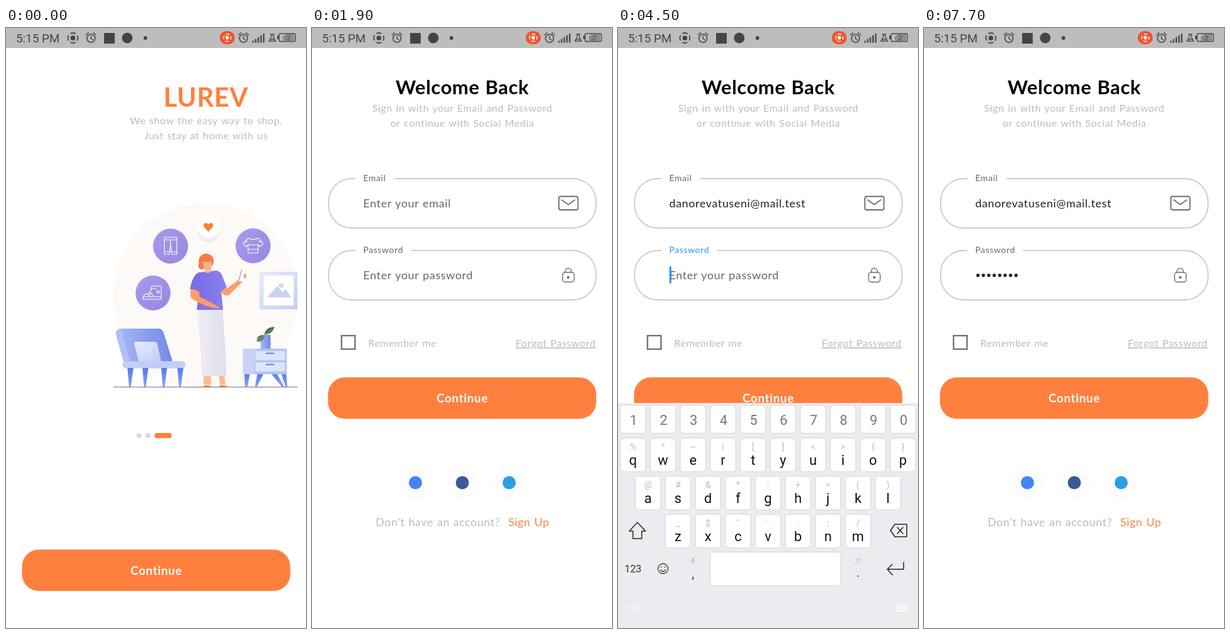
An HTML page that plays this animation: 480 by 960 pixels, repeating every 8 s.

```html
<!DOCTYPE html>
<html lang="en">
<head>
<meta charset="utf-8">
<style>
html, body { margin: 0; width: 100%; height: 100%; overflow: hidden; background: #fff; }
svg { display: block; width: 480px; height: 960px; font-family: Lato, sans-serif; letter-spacing: .04em; word-spacing: .06em; }
text { text-anchor: middle; fill: #bbb; white-space: pre; }
.start { text-anchor: start; }
.bold { font-weight: 700; }
.ui { font-family: Roboto, "Noto Sans CJK JP", sans-serif; letter-spacing: 0; word-spacing: 0; }
.line { fill: none; stroke-linecap: round; stroke-linejoin: round; }
</style>
</head>
<body>
<svg id="stage" viewBox="0 0 480 960">
<defs>
  <linearGradient id="violet" x1="0" y1="0" x2="1" y2="1"><stop stop-color="#a69bf0"/><stop offset="1" stop-color="#9488df"/></linearGradient>
  <linearGradient id="blue"><stop stop-color="#a9b8f6"/><stop offset="1" stop-color="#7088e8"/></linearGradient>
  <linearGradient id="pale" x1="0" y1="0" x2="1" y2="1"><stop stop-color="#e6ebfc"/><stop offset="1" stop-color="#c3cdf5"/></linearGradient>
  <linearGradient id="blouse"><stop stop-color="#766be6"/><stop offset="1" stop-color="#8a80ee"/></linearGradient>
  <linearGradient id="skirt"><stop stop-color="#f0eef3"/><stop offset="1" stop-color="#dfdeee"/></linearGradient>
  <linearGradient id="leg" x2="0" y2="1"><stop stop-color="#557be8"/><stop offset="1" stop-color="#86a5f8"/></linearGradient>
</defs>
</svg>
<script>
const ORANGE = '#ff803e', BLUE = '#2196f3', EMAIL = 'danorevatuseni@mail.test', SHORT = 'dan...@mai...test';
const stage = document.getElementById('stage');
const $ = id => document.getElementById(id);
const esc = s => s.replace(/&/g, '&amp;').replace(/</g, '&lt;');

const text = (x, y, size, str, attrs = '') =>
  `<text x="${x}" y="${y}" font-size="${size}" ${attrs}>${esc(str)}</text>`;
const fill = color => `style="fill:${color}"`;
const rect = (x, y, w, h, color, r = 0, attrs = '') =>
  `<rect x="${x}" y="${y}" width="${w}" height="${h}" rx="${r}" fill="${color}" ${attrs}/>`;
const circle = (x, y, r, color, attrs = '') =>
  `<circle cx="${x}" cy="${y}" r="${r}" fill="${color}" ${attrs}/>`;
const shape = (d, color) => `<path d="${d}" fill="${color}"/>`;
const line = (d, color = '#222', width = 1.5) =>
  `<path class="line" d="${d}" stroke="${color}" stroke-width="${width}"/>`;
const ring = (x, y, r, color = '#222', width = 1.5, attrs = '') =>
  circle(x, y, r, 'none', `stroke="${color}" stroke-width="${width}" ${attrs}`);
const group = (id, body, attrs = '') => `<g id="${id}" ${attrs}>${body}</g>`;
const button = y => rect(25.6, y, 429.2, 66.3, ORANGE, 27) +
  text(240.5, y + 40.3, 19, 'Continue', `class="bold" ${fill('#fff')}`);

function statusBar() {
  const ink = '#444';
  const record = (x, y, r, c) => circle(x, y, r * .48, c) +
    ring(x, y, r, c, r * .22, `stroke-dasharray="${r * 1.1} ${r * .47}" stroke-dashoffset="${r * .55}"`);
  const alarm = x => ring(x, 16.5, 6.5, ink, 1.6) + line(`M${x} 13v4l3 2M${x - 8} 11l4-3.500M${x + 8} 11l-4-3.500`, ink, 1.5);
  const bars = [0, 1, 2, 3, 4].map(i => rect(394 + i * 4.3, 20.5 - i * 2.9, 2.3, 3 + i * 2.9, ink)).join('');
  return rect(0, 0, 480, 32, '#bdbdbd') +
    text(16, 23, 19, '5:15 PM', `class="ui start" ${fill(ink)}`) +
    record(107, 16, 8, ink) + alarm(136) + rect(157, 8, 17, 17, ink) + circle(194, 16, 8.5, ink) + circle(223, 16, 3, ink) +
    rect(342, 5, 24, 21, '#f4512c', 10.5) + record(354, 15.5, 6, '#fff') + alarm(380) + bars +
    line('M423 10h6M424.500 10v4l-4 7h11l-4-7v-4M422.500 18h7', ink, 1.3) +
    rect(447, 10, 14, 10, '#8d8d8d') + rect(437, 9, 26, 12.5, 'none', 2, `stroke="${ink}" stroke-width="1.4"`) +
    rect(434, 12, 2.5, 6, ink) + text(449, 19.5, 11, '62', `class="ui" ${fill(ink)}`);
}

function chair() {
  return shape('M186 481H245Q251 481 253 488L268 536H194Q190 536 188 531L177 491Q175 481 186 481Z', 'url(#blue)') +
    shape('M180 483Q176 485 177 491L188 531Q190 536 194 536H200L184 481Z', '#b3c0f6') +
    shape('M209 502H238Q242 502 243 506L249 533H213L206 506Q205 502 209 502Z', 'url(#pale)') +
    circle(232, 518, 1.3, '#fff') +
    rect(187, 533, 101, 11.5, '#c3cdf7', 6) +
    [195, 219, 249, 275].map(x => shape(`M${x} 544h9.500l-4 30h-3z`, 'url(#leg)')).join('');
}

function cabinet() {
  const drawer = y => rect(400, y, 47, 14.5, '#dce4fb') + line(`M417 ${y + 3.5}h12`, '#5b83ee', 2);
  return shape('M382 553h9l-4 21h-4zM403 553h10l-11 21h-3zM425 553h9l12 21h-4zM441 553h8l2 21h-3z', 'url(#leg)') +
    rect(380, 513, 70, 41, '#b5c2f3') + rect(380, 513, 19, 41, '#c9d3f7') + drawer(517) + drawer(535) +
    rect(408, 491, 16, 22, 'url(#blue)') +
    shape('M415 492Q401 489 402 502Q413 502 415 492Z', '#52806b') +
    shape('M414 491Q416 479 430 478Q428 489 414 491Z', '#3a6c5c') +
    line('M404 500L414 492L428 480', '#d8a85c', .9);
}

function woman() {
  const skin = '#ff9c6b', peach = '#ffb996';
  return shape('M317 555h11l1 16h-12zM341 555h9l2 16h-9z', peach) +
    shape('M317 575v-3h9l5 3zM342 575v-3h9l6 3z', ORANGE) +
    shape('M308 450H347Q352 505 353 557H314Q312 500 306 460Z', 'url(#skirt)') +
    shape('M343 419L355 416L374 402L379 406L358 427Q352 430 347 425Z', skin) +
    shape('M320 390L338 388Q344 390 346 395L354 415L345 421L348 451H306L309 422L295 418Q299 396 309 391Z', 'url(#blouse)') +
    shape('M297 417L309 421L311 430L332 441Q342 446 342 449Q318 447 298 433Q294 429 297 417Z', skin) +
    shape('M319 382H329V389Q325 395 319 390Z', peach) +
    circle(321, 373, 12, '#f97b43') + circle(314, 380.5, 5.5, '#f97b43') +
    shape('M315 374H330Q331 386 323 387Q316 385 315 374Z', '#ffb08a') +
    shape('M378 387L391 387L387 406L373 405Z', '#fff') + line('M378 387L373 404', '#6f7fdc', 1) +
    `<ellipse cx="383" cy="397" rx="2" ry="4" fill="${skin}"/>`;
}

function intro() {
  const pants = 'M254 335h20v27h-8l-2-16-2 16h-8zM254 339h20M264 339v7M254 358h8M266 358h8';
  const shirt = 'M388 336q8 5 16 0l8 9-4 5-4-3v13h-16v-13l-4 3-4-5zM388 347h16M388 354h16M382 343l5-2M410 343l-5-2';
  const boot = 'M234 413h15v21h-29q-1-6 4-8l7-2zM220 430h29M234 417h7M232 424l4 4M228 426l4 4M242 422a2 2 0 1 0 4 0a2 2 0 1 0-4 0';
  return text(320.5, 125.5, 42, 'LUREV', `class="bold" ${fill(ORANGE)}`) +
    text(321, 154, 16, 'We show the easy way to shop.') + text(321, 178, 16, 'Just stay at home with us') +
    circle(320, 429, 149, '#fcf9f7') +
    [[264, 349, pants], [396, 348.5, shirt], [236, 424, boot]].map(([x, y, d]) =>
      circle(x, y, 28, 'url(#violet)') + line(d, '#fff', 1.1)).join('') +
    circle(325, 325, 18, '#ededf1') + circle(325, 318, 18.5, '#fff') +
    shape('M324.500 326L318 319Q315 315 318.500 312.500Q322 310.500 324.500 314.500Q327 310.500 330.500 312.500Q334 315 331 319Z', '#fb7f36') +
    rect(406, 390, 61, 60, 'url(#pale)') + rect(413, 396, 48, 48, '#fff') +
    shape('M418 431L435 413L443 422L448 418L457 431Z', '#c9d4f5') + circle(441, 412, 4, '#d3dbf6') +
    chair() + cabinet() + woman() + line('M173 574.500H467', '#777', 1);
}

function field(y, id, label, hint, notch) {
  return line(`M${notch} ${y}H417.500a37 37 0 0 1 37 37v5a37 37 0 0 1-37 37H63.500a37 37 0 0 1-37-37v-5a37 37 0 0 1 37-37H69`, '#bdbdbd', 1.4) +
    text(82, y + 4, 14, label, `id="${id}Label" class="start"`) +
    text(82, y + 46, 18, hint, `id="${id}Hint" class="start" ${fill('#666')}`);
}

function login() {
  const grey = '#6b6b6b';
  const dots = [...Array(8).keys()].map(i => circle(86.3 + i * 8.7, 395.7, 2.7, '#222', 'class="dot"')).join('');
  const social = ['#4285f4', '#3b5998', '#2a9fe4'].map((c, i) =>
    circle(165.5 + i * 75, 727.5, 25, '#fcfcfc') + circle(165.5 + i * 75, 727.5, 10.5, c)).join('');
  return rect(0, 32, 480, 928, '#fff') +
    text(240.5, 106, 31, 'Welcome Back', `class="bold" ${fill('#000')}`) +
    text(240.5, 134, 16, 'Sign in with your Email and Password') +
    text(240.5, 158, 16, 'or continue with Social Media') +
    field(241, 'email', 'Email', 'Enter your email', 132) + field(356, 'pass', 'Password', 'Enter your password', 159) +
    text(82, 287, 18, EMAIL, `id="email" class="start" ${fill('#222')}`) + dots +
    rect(0, 0, 3, 27, BLUE, 0, 'id="cursor"') +
    rect(395, 269.5, 30.5, 21.5, 'none', 3, `stroke="${grey}" stroke-width="1.8"`) + line('M399.500 275l10.500 7.500 10.500-7.500', grey, 1.6) +
    rect(401, 391, 18.5, 15.5, 'none', 4, `stroke="${grey}" stroke-width="1.4"`) +
    line('M405 391v-2a5 4.500 0 0 1 10 0v2', grey, 1.4) + circle(410, 399, 2.1, grey) +
    rect(47.2, 492.2, 21.6, 21.6, 'none', 0, 'stroke="#757575" stroke-width="2.4"') +
    text(90, 510, 16, 'Remember me', 'class="start"') +
    text(326, 510, 16, 'Forgot Password', 'class="start" text-decoration="underline"') +
    button(559) + social +
    text(102, 797, 17.8, "Don't have an account?", 'class="start"') +
    text(314, 797, 17.8, 'Sign Up', `class="start" ${fill(ORANGE)}`);
}

function toolbar() {
  const suggest = (x, size, str, c) => text(x, size > 18 ? 635 : 632.5, size, str, fill(c));
  return rect(25, 570.5, 26, 19, 'none', 4, 'stroke="#222" stroke-width="1.6"') +
    text(38, 584, 10.5, 'GIF', `class="bold" ${fill('#222')}`) +
    line('M97 569h16q4 0 4 4v10l-8 8h-12q-4 0-4-4v-14q0-4 4-4zM117 583h-5q-3 0-3 3v5M98 581q5 6 9 1M100 575v1M110 575v1') +
    line('M167 571h-4v22h20v-22h-4M168 568h10v5h-10zM167 579h12M167 583h12M167 587h7') +
    text(232, 591, 21, 'a', fill('#222')) + text(247, 583, 15, 'あ', fill('#222')) +
    line('M230 576q0-4 6-5M234 568l3 3-3 3M252 586q0 4-6 4M248 587l-3 3 3 3', '#222', 1.3) +
    line('M294 581l4-4 6 6 12-13 4 4-16 17zM304 578l8-8', '#222', 1.3) +
    ring(376, 581, 13) + line('M376 579v8') + circle(376, 574.5, 1.3, '#222') +
    [436, 443, 450].map(x => circle(x, 581, 1.6, '#222')).join('') +
    rect(0, 604.5, 480, 47, '#fbfbfc', 0, 'stroke="#d3d3d7" stroke-width="1"') +
    line('M17 620l5 5 5-5M17 636l5-5 5 5', '#777', 1.4) + suggest(240, 15, SHORT, '#111') +
    group('words', suggest(103, 21, 'I', '#888') + suggest(377, 21, 'the', '#888')) +
    group('endings', suggest(103, 10, SHORT + 'p', '#888') + suggest(377, 10, SHORT + 'h', '#888'));
}

function keyboard(secret) {
  const key = (x, y, w, h) => rect(x + .5, y + .5, w - 1, h - 1, '#fff', 6, 'stroke="#d2d2d7"');
  const letters = ['qwertyuiop', 'asdfghjkl', 'zxcvbnm'];
  const hints = [secret ? '%^~|[]<>{}' : '1234567890', '@#&*-+=()', '_$"\':;/'];
  const top = secret ? 600 : 556;
  const [num, face, mic, dot, enter] = secret ? [24, 72, 120, 384, 444] : [26, 77, 125, 403, 453];
  let out = rect(0, top, 480, 820, '#ebecf0');
  if (secret) [...'1234567890'].forEach((c, i) =>
    out += key(3 + 48 * i, 603, 42, 46) + text(25 + 48 * i, 634.5, 22, c, fill('#777')));
  else out += toolbar();
  letters.forEach((row, r) => [...row].forEach((c, i) => {
    const x = [3, 27, 75][r] + 48 * i, y = [655.5, 716.5, 777.5][r];
    out += key(x, y, 42, 55) + text(x + 21, y + 19.5, 14, hints[r][i]) + text(x + 21, y + 43, 22, c, fill('#111'));
  }));
  out += line('M31 791l13 14h-6v12h-14v-12h-6z') +
    line('M443 794h19v20h-19l-7-10zM447 799l9 10M456 799l-9 10') +
    text(num, secret ? 871 : 872, secret ? 16 : 20, '123', fill('#333')) +
    ring(face, 865, 8, '#333', 1.3) + line(`M${face - 4} 867q4 5 8 0M${face - 3} 862v1M${face + 3} 862v1`, '#333', 1.3) +
    rect(mic - 1.5, 848, 3, 6, '#bbb', 1.5) + line(`M${mic - 3} 853q3 5 6 0M${mic} 856v2`, '#bbb', 1) +
    text(mic, 880, 20, ',', fill('#333')) + text(dot, 858, 12, ',!?') + text(dot, 878, 20, '.', fill('#333')) +
    (secret ? key(147, 838, 210, 55) + line(`M${enter + 13} 855v11h-26M${enter - 5} 858l-8 8 8 9`)
      : key(152, 838, 176, 55) + text(355, 878, 18, '@', fill('#333')) + line('M463 857v8h-20M449 859l-6 6 6 6', '#333'));
  return group(secret ? 'secretKeys' : 'emailKeys', out, 'class="ui"');
}

function navIcons() {
  let keys = '';
  for (let r = 0; r < 2; r++) for (let i = 0; i < 5; i++) keys += rect(443.5 + i * 4 + r * 1.5, 923 + r * 4, 2.5, 2.5, '#fff');
  return line('M21 925l5.500 5.500 5.500-5.500', '#fff', 1.6) + keys + rect(448, 931.5, 11, 2.5, '#fff');
}

stage.insertAdjacentHTML('beforeend',
  group('intro', intro()) +
  circle(212.7, 652, 4, '#d9d9d9') + circle(227, 652, 4, '#d9d9d9') + rect(237.8, 648, 27.2, 8.2, ORANGE, 4) + button(834.5) +
  group('login', login()) + keyboard(false) + keyboard(true) + navIcons() + statusBar());

const show = (el, on) => el.setAttribute('display', on ? 'inline' : 'none');
const clamp = (v, lo = 0, hi = 1) => Math.min(hi, Math.max(lo, v));
const dots = document.querySelectorAll('.dot');

const FADE = 880, FOCUS = 2300, RISE = 2400, FILLED = 3300, SWITCH = 4500, TYPE = 5750, KEY_GAP = 140, CLOSE = 6950;

function draw(t) {
  const slide = t < 700 ? 80 * Math.exp(-t / 115) : 0;
  $('intro').setAttribute('transform', `translate(${slide - 80})`);
  $('login').setAttribute('opacity', clamp((t - FADE) / 220));
  show($('login'), t >= FADE);

  const onEmail = t >= FOCUS && t < SWITCH, onPass = t >= SWITCH && t < CLOSE;
  const filled = t >= FILLED, typed = clamp(Math.floor((t - TYPE) / KEY_GAP) + 1, 0, 8);
  $('emailLabel').style.fill = onEmail ? BLUE : '#666';
  $('passLabel').style.fill = onPass ? BLUE : '#666';
  show($('email'), filled);
  show($('emailHint'), !filled);
  $('email').setAttribute('text-decoration', onEmail ? 'underline' : 'none');
  show($('passHint'), !typed);
  dots.forEach((d, i) => show(d, i < typed));

  const since = t - (onPass ? SWITCH : filled ? FILLED : FOCUS);
  show($('cursor'), (onEmail || onPass) && (typed || since % 1000 < 500));
  const width = onPass ? typed * 8.7 : filled ? $('email').getComputedTextLength() : 0;
  $('cursor').setAttribute('x', 82.3 + width);
  $('cursor').setAttribute('y', onPass ? 381.5 : 266.5);

  const rise = (1 - clamp((t - RISE) / 353)) ** 3, fall = clamp((t - CLOSE) / 300) ** 2;
  show($('emailKeys'), t >= RISE && t < SWITCH);
  show($('secretKeys'), t >= SWITCH && t < CLOSE + 300);
  $('emailKeys').setAttribute('transform', `translate(0 ${404 * rise})`);
  $('secretKeys').setAttribute('transform', `translate(0 ${360 * fall})`);
  show($('words'), !filled);
  show($('endings'), filled);
}

const start = performance.now();
function tick() {
  draw((performance.now() - start) % 8000);
  requestAnimationFrame(tick);
}
tick();
</script>
</body>
</html>
```
